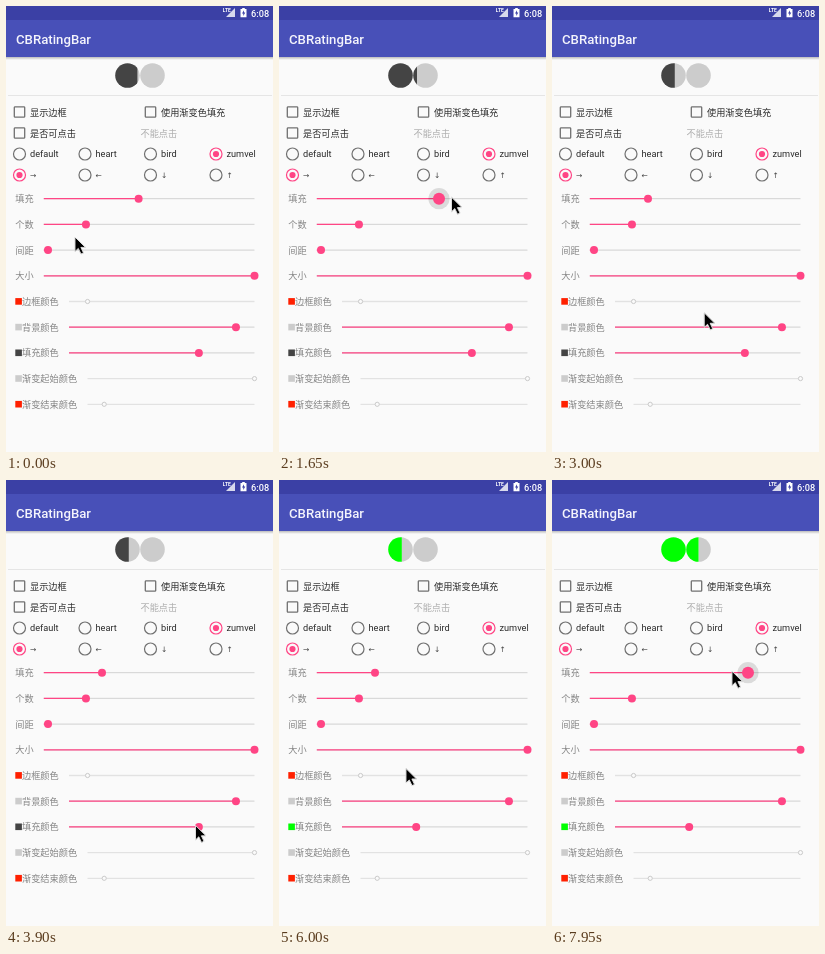
Animation of 267 by 446 pixels, one loop 8000 ms. Source, as an HTML page:

```html
<!DOCTYPE html>
<html lang="zh-CN">
<head>
<meta charset="utf-8">
<title>CBRatingBar</title>
<style>
html, body { margin: 0; width: 100%; height: 100%; overflow: hidden; background: #fafafa; }
svg { display: block; width: 100%; height: 100%; }
text { font: 9.2px Roboto, "Noto Sans CJK SC", "Noto Sans CJK", sans-serif; fill: #2c2c2c; }
.bold { font-weight: 500; fill: #fff; }
.title { font-size: 13.2px; fill: #f4f4fc; }
.net { font-size: 5px; font-weight: 700; }
.label { fill: #858585; }
.off { fill: #adadad; }
.arrow { font: 7.5px "DejaVu Sans", sans-serif; fill: #444; }
.cursor { filter: drop-shadow(.8px .8px .6px rgba(0, 0, 0, .35)); }
</style>
</head>
<body>
<svg id="stage" viewBox="0 0 267 446">
  <defs>
    <linearGradient id="shade" x2="0" y2="1">
      <stop stop-color="#000" stop-opacity=".25"/>
      <stop offset="1" stop-color="#000" stop-opacity="0"/>
    </linearGradient>
    <clipPath id="filled"><rect id="filledBox" x="108" y="55" height="30"/></clipPath>
    <clipPath id="empty"><rect id="emptyBox" y="55" width="60" height="30"/></clipPath>
  </defs>
</svg>
<script>
const LOOP = 8000, STEP = 150;
const PINK = '#ff4585', TRACK = '#d9d9d9', RING = '#707070';
const END = 248.5, CHAR = 9.25;
const PALETTE = ['#000', '#ff2000', '#00f', 'none', '#0f0', '#0ff', '#f0f', '#444', '#888', '#ccc', '#ccc'];
const stage = document.getElementById('stage');
const filledBox = document.getElementById('filledBox');
const emptyBox = document.getElementById('emptyBox');

function set(el, attrs) {
  for (const k in attrs) el.setAttribute(k, attrs[k]);
}
function add(tag, attrs, text) {
  const el = document.createElementNS('http://www.w3.org/2000/svg', tag);
  set(el, attrs);
  if (text) el.textContent = text;
  return stage.appendChild(el);
}
const rect = (x, y, width, height, fill, more) => add('rect', { x, y, width, height, fill, ...more });
const circle = (cx, cy, r, fill, more) => add('circle', { cx, cy, r, fill, ...more });
const label = (x, y, text, cls = '') => add('text', { x, y, class: cls }, text);
const line = (x1, x2, y, stroke, width) =>
  add('line', { x1, x2, y1: y, y2: y, stroke, 'stroke-width': width });
const clamp = (v, lo, hi) => Math.min(hi, Math.max(lo, v));

// Header
rect(0, 0, 267, 446, '#fafafa');
rect(0, 0, 267, 14, '#3b40a5');
rect(0, 14, 267, 37, '#4850b8');
rect(0, 51, 267, 3, 'url(#shade)');
label(10, 37.6, 'CBRatingBar', 'bold title');
label(216.8, 5.800, 'LTE', 'bold net');
add('path', { d: 'M229 2V11H220Z', fill: '#fff', opacity: .8 });
add('path', { d: 'M234.500 3h1.700v-1h2.600v1h1.700v8.300h-6z', fill: '#fff' });
add('path', { d: 'M238 4.200l-2 3.300h1.300v2.500l2 -3.400h-1.300z', fill: '#3b40a5' });
label(245, 10.5, '6:08', 'bold');

// Rating bar
const marks = clip => {
  const group = add('g', { 'clip-path': `url(#${clip})`, fill: '#ccc' });
  for (const x of [121.5, 146.5]) group.appendChild(circle(x, 69.5, 12.3, 'inherit'));
  group.querySelectorAll('circle').forEach(c => c.removeAttribute('fill'));
  return group;
};
marks('empty');
const rating = marks('filled');
line(2, 266, 89.5, '#e5e5e5', 1);

// Check boxes and radio buttons
const column = i => 13.5 + i * 65.5;
function check(col, y, text) {
  const x = column(col);
  rect(x - 5.2, y - 5.2, 10.4, 10.4, 'none', { rx: .8, stroke: RING, 'stroke-width': 1.3 });
  label(x + 10.5, y + 3.6, text);
}
check(0, 106, '显示边框');
check(2, 106, '使用渐变色填充');
check(0, 127, '是否可点击');
label(134.5, 130.6, '不能点击', 'off');

function radios(y, names, chosen, cls) {
  names.forEach((name, i) => {
    const x = column(i), on = i === chosen;
    circle(x, y, 6, 'none', { stroke: on ? PINK : RING, 'stroke-width': 1.2 });
    if (on) circle(x, y, 3.1, PINK);
    label(x + 10.5, y + 3.4, name, cls);
  });
}
radios(148, ['default', 'heart', 'bird', 'zumvel'], 3);
radios(169, ['→', '←', '↓', '↑'], 0, 'arrow');

// Sliders: long labels get a swatch in the colour of their value
const rowY = i => 192.7 + i * 25.7;
function slider(row, text, value, enabled = true) {
  const y = rowY(row), colored = text.length > 2;
  const textX = colored ? 16 : 9.3;
  const start = textX + text.length * CHAR + 10;
  const toX = v => start + v * (END - start);
  const box = colored && rect(9.3, y - 3.4, 6.6, 6.6, PALETTE[Math.round(value * 10)]);
  label(textX, y + 3.4, text, 'label');
  line(start, END, y, enabled ? TRACK : '#e2e2e2', 1.3);
  if (!enabled) {
    circle(toX(value), y, 2.1, '#fafafa', { stroke: '#cacaca', 'stroke-width': 1 });
    return;
  }
  const bar = line(start, start, y, PINK, 1.3);
  const halo = circle(0, y, 10.6, '#000', { opacity: 0 });
  const thumb = circle(0, y, 4, PINK);
  function move(v, pressed) {
    const x = toX(v);
    bar.setAttribute('x2', x);
    set(halo, { cx: x, opacity: pressed ? .12 : 0 });
    set(thumb, { cx: x, r: pressed ? 6 : 4 });
  }
  move(value);
  return { box, move, value, toValue: x => clamp((x - start) / (END - start), 0, 1) };
}
const amount = slider(0, '填充', .45);
slider(1, '个数', .2);
slider(2, '间距', .02);
slider(3, '大小', 1);
slider(4, '边框颜色', .1, false);
slider(5, '背景颜色', .9);
const tint = slider(6, '填充颜色', .7);
slider(7, '渐变起始颜色', 1, false);
slider(8, '渐变结束颜色', .1, false);

const cursor = add('path', {
  class: 'cursor',
  d: 'M0 0V14.500L3.300 11.400L6 17L8.500 15.900L5.900 10.400H10.500Z',
  fill: '#000', stroke: '#fff', 'stroke-width': .8
});

// Pointer stops: time, x, y
const TOP = rowY(0) - 1.5, LOW = rowY(6) - 1.5;
const STOPS = [
  [0, 69, 231], [900, 194, 196], [1200, 135, TOP], [2100, 210, TOP], [2250, 158, TOP], [2550, 96, TOP],
  [3150, 171, LOW], [3900, 189.5, LOW], [4050, 189.5, LOW], [4800, 117.5, LOW], [5250, 117.5, LOW],
  [5850, 136, LOW], [6450, 100, 118], [6900, 96.5, TOP], [7050, 96.5, TOP],
  [7350, 256, TOP], [7650, 256, TOP], [7800, 196, TOP], [7950, 180, TOP]
];
function pointer(t) {
  const i = STOPS.findIndex(s => s[0] >= t);
  if (i < 1) return STOPS[0].slice(1);
  const [t0, x0, y0] = STOPS[i - 1], [t1, x1, y1] = STOPS[i];
  const p = (t - t0) / (t1 - t0);
  return [x0 + (x1 - x0) * p, y0 + (y1 - y0) * p];
}

// A dragged thumb trails the pointer by one step and stays where it was released
amount.drags = [[1350, 2700], [7200, LOOP]];
tint.drags = [[4350, 6000]];
function drag(s, t) {
  const last = s.drags.filter(d => d[0] <= t).pop();
  if (!last) return [s.value, false];
  return [s.toValue(pointer(Math.min(t, last[1]) - STEP)[0]), t < last[1]];
}

function draw(time) {
  const t = Math.floor(time % LOOP / STEP) * STEP;
  const [share, held] = drag(amount, t);
  amount.move(share, held);

  const [shade, tinting] = drag(tint, t);
  const notch = Math.round(shade * 10);
  tint.move(notch / 10, tinting);
  tint.box.setAttribute('fill', PALETTE[notch]);
  rating.setAttribute('fill', PALETTE[notch]);

  const edge = 109 + share * 50;
  filledBox.setAttribute('width', edge - 108);
  emptyBox.setAttribute('x', edge);
  cursor.setAttribute('transform', `translate(${pointer(t)})`);
}

const begin = performance.now();
function tick() {
  draw(performance.now() - begin);
  requestAnimationFrame(tick);
}
tick();
</script>
</body>
</html>
```
